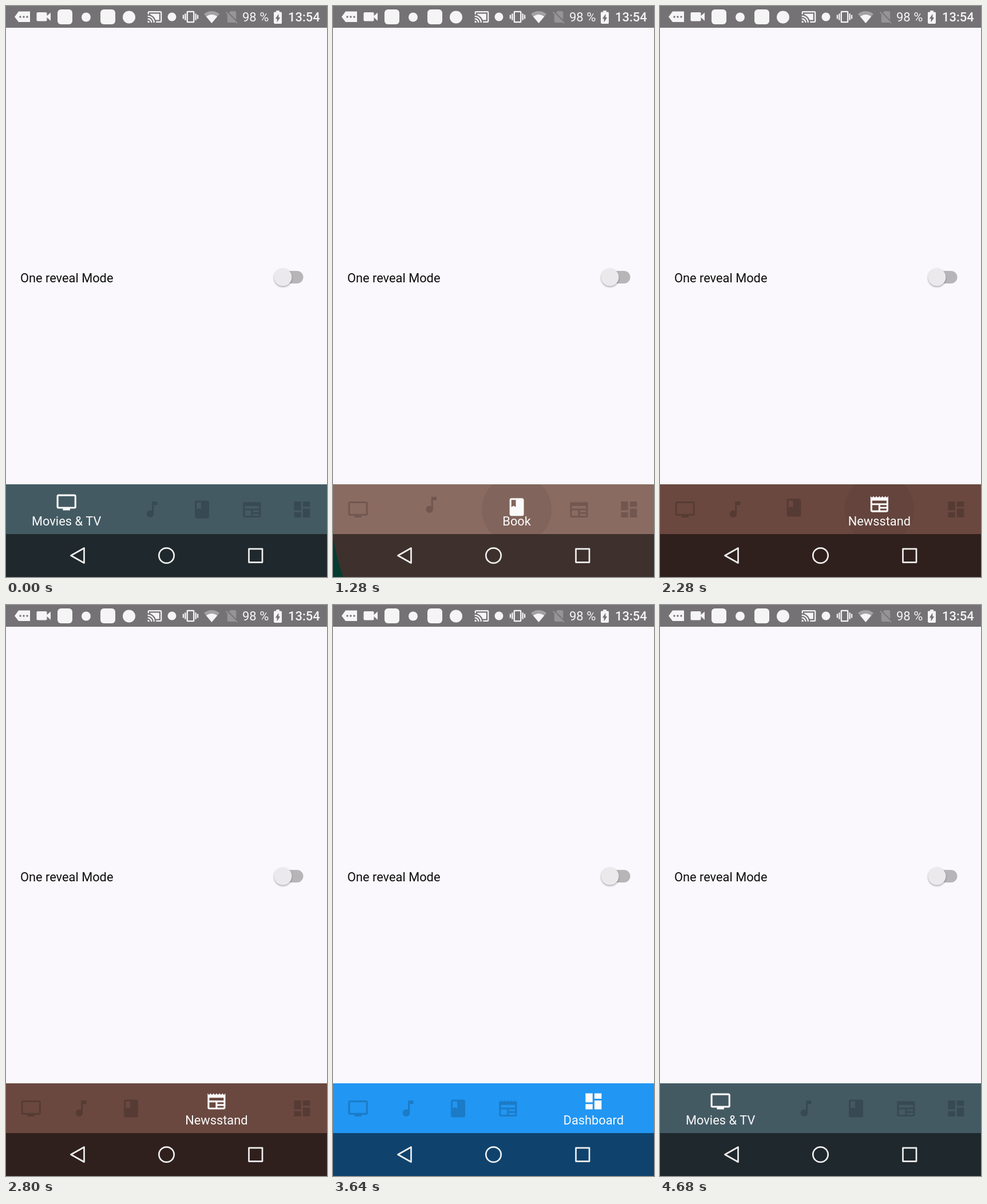
Write an HTML page with a canvas that moves like this. It is 561x998 px and loops after 5.08 s.

```html
<!DOCTYPE html>
<html lang="en">
<head>
<meta charset="utf-8">
<title>Bottom navigation</title>
<style>
  html, body { margin: 0; width: 100%; height: 100%; overflow: hidden; background: #faf8fc; }
  canvas { display: block; width: 561px; height: 998px; }
</style>
</head>
<body>
<canvas id="stage"></canvas>
<script>
const W = 561, H = 998, LOOP = 5080, TICK = 40;
const BAR_TOP = 836, BAR_END = 923, MID = 880;
const DP = W / 360;
const SLOT = 87.4, WIDE = W - 4 * SLOT;
const MOVE = 300, REVEAL_R = 1000, RIPPLE_R = 61;
const FONT = 'Roboto, sans-serif';

const canvas = document.getElementById('stage');
const ratio = window.devicePixelRatio || 1;
canvas.width = W * ratio;
canvas.height = H * ratio;
const ctx = canvas.getContext('2d');

const icon = {
  tv: 'M21 3H3c-1.1 0-2 .9-2 2v12c0 1.1.9 2 2 2h5v2h8v-2h5c1.1 0 2-.9 2-2V5c0-1.1-.9-2-2-2zm0 14H3V5h18v12z',
  note: 'M12 3v10.55c-.59-.34-1.27-.55-2-.55-2.21 0-4 1.79-4 4s1.79 4 4 4 4-1.79 4-4V7h4V3h-6z',
  book: 'M18 2H6c-1.1 0-2 .9-2 2v16c0 1.1.9 2 2 2h12c1.1 0 2-.9 2-2V4c0-1.1-.9-2-2-2zM6 4h5v8l-2.5-1.5L6 12V4z',
  news: 'M22 3l-1.67 1.67L18.67 3 17 4.67 15.33 3l-1.66 1.67L12 3l-1.67 1.67L8.67 3 7 4.67 5.33 3 3.67 4.67 2 3v16c0 1.1.9 2 2 2h16c1.1 0 2-.9 2-2V3zM11 19H4v-6h7v6zm9 0h-7v-2h7v2zm0-4h-7v-2h7v2zm0-4H4V8h16v3z',
  dash: 'M3 13h8V3H3v10zm0 8h8v-6H3v6zm10 0h8V11h-8v10zm0-18v6h8V3h-8z',
  cast: 'M1 18v3h3c0-1.66-1.34-3-3-3zm0-4v2c2.76 0 5 2.24 5 5h2c0-3.87-3.13-7-7-7zm18-7H5v1.63c3.96 1.28 7.09 4.41 8.37 8.37H19V7zM1 10v2c4.97 0 9 4.03 9 9h2c0-6.08-4.93-11-11-11zm20-7H3c-1.1 0-2 .9-2 2v3h2V5h18v14h-7v2h7c1.1 0 2-.9 2-2V5c0-1.1-.9-2-2-2z',
  vibrate: 'M0 15h2V9H0v6zm3 2h2V7H3v10zm19-8v6h2V9h-2zm-3 8h2V7h-2v10zM16.5 3h-9C6.67 3 6 3.67 6 4.5v15c0 .83.67 1.5 1.5 1.5h9c.83 0 1.5-.67 1.5-1.5v-15c0-.83-.67-1.5-1.5-1.5zM16 19H8V5h8v14z',
  noSim: 'M19 5c0-1.1-.9-2-2-2h-7L7.66 5.34 19 16.68V5zM3.65 3.88L2.38 5.15 5 7.77V19c0 1.1.9 2 2 2h10c.35 0 .67-.1.96-.26l1.88 1.88 1.27-1.27L3.65 3.88z',
  battery: 'M15.67 4H14V2h-4v2H8.33C7.6 4 7 4.6 7 5.33v15.33C7 21.4 7.6 22 8.33 22h7.33c.74 0 1.34-.6 1.34-1.33V5.33C17 4.6 16.4 4 15.67 4zM11 20v-5.5H9L13 7v5.5h2L11 20z'
};
for (const key in icon) icon[key] = new Path2D(icon[key]);

const tabs = [
  { icon: icon.tv, label: 'Movies & TV', color: '#445a63' },
  { icon: icon.note, label: 'Movies & TV', color: '#07866a' },
  { icon: icon.book, label: 'Book', color: '#8a6b62' },
  { icon: icon.news, label: 'Newsstand', color: '#6a4840' },
  { icon: icon.dash, label: 'Dashboard', color: '#2196f3' }
];
const taps = [
  { at: 120, to: 1 }, { at: 1160, to: 2 }, { at: 2080, to: 3 },
  { at: 3120, to: 4 }, { at: 4280, to: 0 }
];

const clamp = v => Math.max(0, Math.min(1, v));
const ease = v => 0.5 - Math.cos(clamp(v) * Math.PI) / 2;

function drawIcon(path, x, y, color, sx = DP, sy = sx) {
  ctx.save();
  ctx.translate(x, y);
  ctx.scale(sx, sy);
  ctx.translate(-12, -12);
  ctx.fillStyle = color;
  ctx.fill(path, 'evenodd');
  ctx.restore();
}

function poly(color, ...pts) {
  ctx.fillStyle = color;
  ctx.beginPath();
  for (let i = 0; i < pts.length; i += 2) ctx.lineTo(pts[i], pts[i + 1]);
  ctx.closePath();
  ctx.fill();
}

function box(color, x, y, w, h, r = 0) {
  ctx.fillStyle = color;
  ctx.beginPath();
  ctx.roundRect(x, y, w, h, r);
  ctx.fill();
}

function disc(color, x, y, r) {
  ctx.fillStyle = color;
  ctx.beginPath();
  ctx.arc(x, y, r, 0, Math.PI * 2);
  ctx.fill();
}

function text(str, x, y, color, size = 14 * DP, weight = 400) {
  ctx.font = `${weight} ${size}px ${FONT}`;
  ctx.fillStyle = color;
  ctx.fillText(str, x, y);
}

function fan(color, x, y, r) {
  ctx.fillStyle = color;
  ctx.beginPath();
  ctx.moveTo(x, y);
  ctx.arc(x, y, r, -Math.PI / 2 - 0.7, -Math.PI / 2 + 0.7);
  ctx.fill();
}

function statusBar() {
  const ink = '#f6f5f6', gray = '#757275';
  box(gray, 0, 0, W, 38);
  poly(ink, 15, 19, 22, 9.5, 42, 9.5, 42, 28, 22, 28);
  for (const x of [25, 31, 37]) disc(gray, x, 19, 1.7);
  box(ink, 53.5, 11, 18, 15.5, 2);
  poly(ink, 70, 18.5, 78, 11.5, 78, 26);
  box(ink, 90, 6, 26, 26, 6);
  disc(ink, 140, 19.5, 8);
  box(ink, 165, 6, 26, 26, 6);
  disc(ink, 215, 19.5, 11);
  drawIcon(icon.cast, 260, 19, ink, 1.12);
  disc(ink, 290, 19, 7.5);
  drawIcon(icon.vibrate, 322.5, 19, ink, 1.14);
  fan('#a3a1a3', 359.5, 30, 21);
  fan(ink, 359.5, 30, 15);
  drawIcon(icon.noSim, 394.5, 19, '#969496', 1.1);
  text('98 %', 413, 27, ink, 22);
  drawIcon(icon.battery, 475, 19.5, ink, 1.4, 1.14);
  text('13:54', 493, 27, ink, 22, 500);
}

function content() {
  text('One reveal Mode', 25, 483, '#0b0b0b');
  box('#b7b5b8', 472, 463, 47.5, 22, 11);
  ctx.save();
  ctx.shadowColor = 'rgba(0,0,0,.35)';
  ctx.shadowBlur = 3 * ratio;
  ctx.shadowOffsetY = 1.5 * ratio;
  disc('#ebe9ec', 484, 474, 15.5);
  ctx.restore();
}

function systemKeys() {
  box('rgba(0,0,0,.55)', 0, BAR_END, W, H - BAR_END);
  ctx.strokeStyle = '#f0f0f0';
  ctx.lineWidth = 2.7;
  ctx.lineJoin = 'round';
  ctx.beginPath();
  ctx.moveTo(136.5, 947.5);
  ctx.lineTo(136.5, 973.5);
  ctx.lineTo(113.5, 960.5);
  ctx.closePath();
  ctx.stroke();
  ctx.beginPath();
  ctx.arc(280.5, 960.5, 13.2, 0, Math.PI * 2);
  ctx.stroke();
  ctx.strokeRect(424.5, 948.8, 23.5, 23.5);
}

function clipTo(x, y, w, h) {
  ctx.save();
  ctx.beginPath();
  ctx.rect(x, y, w, h);
  ctx.clip();
}

function drawTab(tab, x, width, lift, active) {
  const mid = x + width / 2;
  drawIcon(tab.icon, mid, MID - 12.4 * lift, active ? '#fafafa' : 'rgba(0,0,0,.18)');
  if (!active) return;
  ctx.font = `400 ${14 * DP}px ${FONT}`;
  const room = width - ctx.measureText(tab.label).width;
  clipTo(x, BAR_TOP, width, BAR_END - BAR_TOP);
  text(tab.label, x + Math.max(0, room / 2), 907.8, '#fafafa');
  ctx.restore();
}

function navigation(t) {
  const n = taps.filter(tap => t >= tap.at).length;
  const tap = n ? taps[n - 1] : { at: -LOOP, to: 0 };
  const age = t - tap.at;
  const from = n > 1 ? taps[n - 2].to : 0;
  const p = ease(age / MOVE);

  // Old colour first, then the new one growing from the tapped slot.
  box(tabs[from].color, 0, BAR_TOP, W, H - BAR_TOP);
  clipTo(0, BAR_TOP, W, H - BAR_TOP);
  const origin = SLOT * (tap.to + 0.5) + (tap.to > from ? WIDE - SLOT : 0);
  disc(tabs[tap.to].color, origin, MID, REVEAL_R * p);
  ctx.restore();

  const lifts = tabs.map((_, i) => i === tap.to ? p : i === from ? 1 - p : 0);
  if (from === tap.to) lifts[from] = 1;
  const widths = lifts.map(v => SLOT + (WIDE - SLOT) * v);
  const lefts = widths.map((_, i) => widths.slice(0, i).reduce((a, b) => a + b, 0));

  const glow = 0.065 * Math.min(clamp(age / 80), clamp((400 - age) / 240));
  clipTo(0, BAR_TOP, W, BAR_END - BAR_TOP);
  disc(`rgba(0,0,0,${glow})`, lefts[tap.to] + widths[tap.to] / 2, MID, RIPPLE_R);
  ctx.restore();

  tabs.forEach((tab, i) => drawTab(tab, lefts[i], widths[i], lifts[i], i === tap.to));
}

function draw(t) {
  ctx.setTransform(ratio, 0, 0, ratio, 0, 0);
  box('#faf8fc', 0, 0, W, H);
  statusBar();
  content();
  navigation(t);
  systemKeys();
}

const start = performance.now();
function frame() {
  const t = (performance.now() - start) % LOOP;
  draw(Math.floor(t / TICK) * TICK);
  requestAnimationFrame(frame);
}
frame();
</script>
</body>
</html>
```
